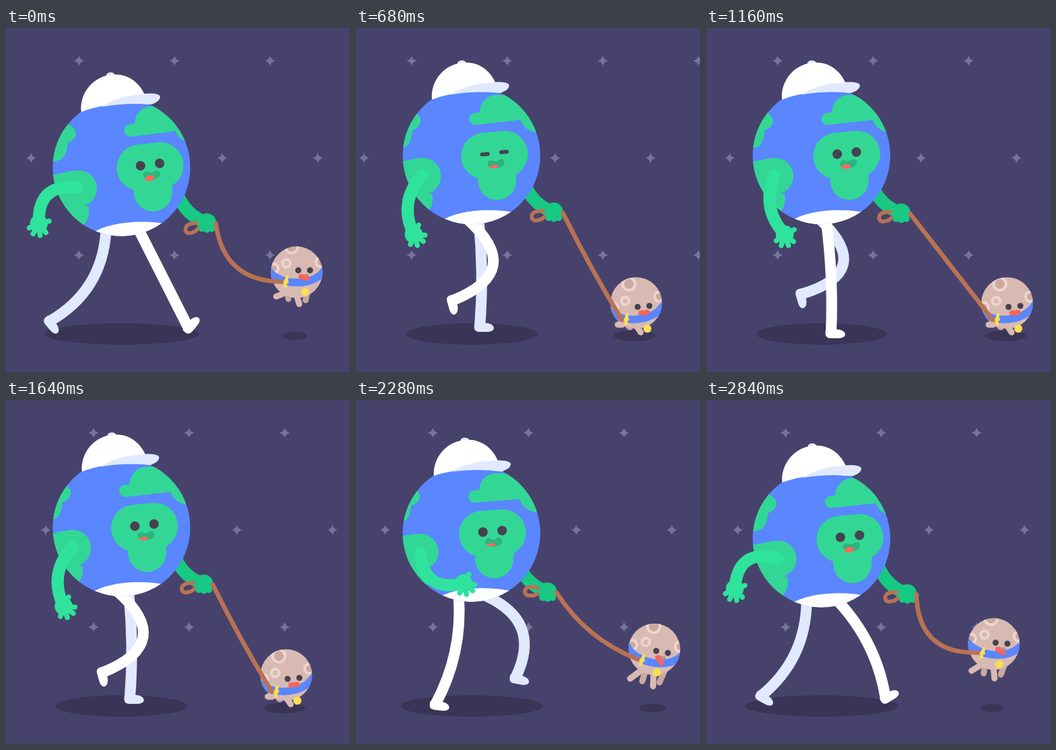
An HTML page for the animation above (2.88 s loop, 540 by 540 pixels).

```html
<!DOCTYPE html>
<html lang="en">
<head>
<meta charset="utf-8">
<title>Moon walk</title>
<style>
  html, body { margin: 0; width: 100%; height: 100%; overflow: hidden; background: #47426c; }
  svg { display: block; width: 100vw; height: 100vh; }
  .line { fill: none; stroke-linecap: round; stroke-linejoin: round; }
</style>
</head>
<body>
<svg viewBox="0 0 540 540">
  <defs>
    <clipPath id="globe"><circle cx="181.3" cy="200" r="108"/></clipPath>
    <clipPath id="disc"><circle r="40.5"/></clipPath>
    <path id="star" d="M0-8Q1.7-1.7 8 0Q1.7 1.7 0 8Q-1.7 1.7-8 0Q-1.7-1.7 0-8Z"/>
    <path id="foot" d="M-8.5-4C-10 5-8 9 0 9H11C18 9 22 6.5 22 3C22-2 15-5 8-5Z"/>
  </defs>

  <rect width="540" height="540" fill="#47426c"/>
  <g id="stars" fill="#78739a"></g>
  <g fill="#3a3457">
    <ellipse id="shade" cx="181.5" cy="480.3" ry="16.8"/>
    <ellipse id="moonShade" cy="483.3"/>
  </g>

  <path id="farArm" class="line" stroke="#17c983" stroke-width="20" d="M-47-46Q-33-10 0 0"/>
  <g id="farLeg" fill="#e0e9fe" stroke="#e0e9fe">
    <path class="line" stroke-width="17"/><use href="#foot" stroke="none"/>
  </g>
  <g id="nearLeg" fill="#fff" stroke="#fff">
    <path class="line" stroke-width="17"/><use href="#foot" stroke="none"/>
  </g>

  <g id="earth">
    <circle cx="181.3" cy="200" r="108" fill="#5a86ff"/>
    <g clip-path="url(#globe)">
      <g id="land" fill="#33d795" stroke="#33d795">
        <g stroke="none">
          <path d="M70 120L96 132Q106 138 105.5 147Q103 157 92 160Q92 175 84 184Q80 188 60 190Z"/>
          <path d="M40 214L80 208Q95 204 108 203.5V258L123 260Q127 280 112 292H40Z"/>
          <circle cx="108.500" cy="232" r="28.500"/>
          <path d="M198 149V131.500A26.500 26.500 0 0 1 224 105H310V166L285 164Q267 160 262 144.500L198 151Z"/>
        </g>
        <g class="line">
          <path d="M191 142.500L255 135.500" stroke-width="19"/>
          <path d="M205 201L237 198" stroke-width="73"/>
          <path d="M225 215V240" stroke-width="60"/>
          <path d="M215.500 213Q224 217 231.500 211.500" stroke="#2ab581" stroke-width="11"/>
        </g>
        <path id="grin" d="M-8.500 1Q0-6 8.500 0Q4 5-6 3Z" fill="#fa6a5a" stroke="none"/>
        <g id="eyes" fill="#46424f" stroke="none"></g>
      </g>
      <path d="M125 308Q150 288 200 286Q230 285 255 291V330H125Z" fill="#fff"/>
    </g>
    <ellipse cx="166.7" cy="55.500" rx="7" ry="5" fill="#dfe8fd"/>
    <path d="M119.500 112C117 82 140 54 173 54C199 54 215 72 222 92L229 102Q165 95 119.500 112Z" fill="#fff"/>
    <path id="brim" d="M150 104.500Q175 88 210 86C232 83 243 86 242 91C241 97 234 100 228 102Q190 98 150 104.500Z" fill="#e0e9fe"/>
  </g>

  <path id="nearArm" class="line" stroke="#2fe39c" stroke-width="19"/>
  <g id="nearHand" fill="#2fe39c">
    <circle r="14"/>
    <path class="line" stroke="#2fe39c" stroke-width="8" d="M0 0L-15 7M0 0L-9 16M0 0L2 18.500M0 0L11 14M0 0L16-4"/>
  </g>

  <g id="moon">
    <g id="paws" class="line" stroke-width="9.500"></g>
    <circle r="40.500" fill="#d8bab3"/>
    <g clip-path="url(#disc)">
      <g class="face">
        <g fill="#cda8a0" stroke="#ecd5cf" stroke-width="4.300">
          <circle cx="-16" cy="-14" r="6" fill="#d8bab3"/>
          <circle cx="-8" cy="-40" r="9.700"/>
          <circle cx="38" cy="-16" r="7.500"/>
          <circle cx="-36" cy="-6" r="7"/>
        </g>
        <g fill="#46424f"><circle cx="2.500" cy="-3" r="4.800"/><circle cx="21" cy="-3" r="4.800"/></g>
        <path class="line" stroke="#5a86ff" stroke-width="12" d="M-46-5C-30 22 28 25 46-6"/>
        <path class="line" stroke="#b8958d" stroke-width="6" d="M8 5.500Q12 8 16 5.500"/>
        <path id="tongue" class="line" stroke="#fa6455" stroke-width="7.500" d="M0 0H10.500"/>
      </g>
    </g>
    <circle id="bell" r="6.300" fill="#ffdf4f"/>
    <g class="face">
      <path class="line" stroke="#ffdf4f" stroke-width="5" d="M-15 8Q-18 15-18 22M-23 16L-15 15"/>
    </g>
  </g>

  <path id="loop" class="line" stroke="#b97254" stroke-width="6" d="M-8-1C-20-3-34-3-35 6C-35 15-26 13-20 11L-8 2"/>
  <g id="fist" fill="#17c983">
    <circle r="14.500"/><circle cx="-8" cy="9.500" r="5"/><circle cy="11" r="5"/><circle cx="8" cy="9.500" r="5"/>
  </g>
  <path id="leash" class="line" stroke="#b97254" stroke-width="7"/>
</svg>

<script>
const LOOP = 2880, WALK = 960, STEP = 480, TICK = 40;
const $ = id => document.getElementById(id);
const set = (el, attrs) => { for (const k in attrs) el.setAttribute(k, attrs[k]); return el; };
const add = (parent, tag, attrs) =>
  parent.appendChild(set(document.createElementNS("http://www.w3.org/2000/svg", tag), attrs));
const move = (el, x, y, a = 0) => set(el, { transform: `translate(${x} ${y}) rotate(${a})` });
const wave = (t, period) => Math.cos(2 * Math.PI * t / period);
const smooth = u => u * u * (3 - 2 * u);

// A limb from a to b, bowed sideways by bend
function noodle([ax, ay], [bx, by], bend) {
  const dx = bx - ax, dy = by - ay, d = Math.hypot(dx, dy);
  const at = u => `${ax + dx * u + bend * dy / d} ${ay + dy * u - bend * dx / d}`;
  return `M${ax} ${ay}C${at(1 / 3)} ${at(2 / 3)} ${bx} ${by}`;
}

for (const [y, x] of [[51.5, 114.5], [204, 39.5], [356.5, 114.5]])
  for (let k = 0; k < 5; k++) add($("stars"), "use", { href: "#star", x: x + 150 * k, y });

const eyes = [[206, 198], [236, 194.7]].map(([x, y]) => ({
  y, el: add($("eyes"), "rect", { x: x - 7.5, width: 15, transform: `rotate(-5 ${x} ${y})` })
}));

// Hip x and resting foot, far paws first
const paws = [[-14, -13, 42], [16, 14, 44], [-22, -32, 38], [-1, 4, 50]].map(([hip, x, y], i) => ({
  hip, x, y, el: add($("paws"), "path", { stroke: i < 2 ? "#c9a8a0" : "#d8bab3" })
}));

// The foot slides back on the ground for one step, then swings forward
function foot(t) {
  const u = t % STEP / STEP, side = 2 * u - 1, arc = Math.sin(Math.PI * u);
  const roll = 8 * side ** 4;
  return t % WALK < STEP
    ? { x: 286 - 215 * u, y: 478 - roll, angle: 50 * side ** 3, bend: 30 * u * u }
    : {
        x: 71 + 215 * smooth(u), y: 478 - roll - 53 * arc ** 1.5,
        angle: 50 - 100 * smooth(u) + 64 * arc, bend: 30 * (1 - u) + 55 * arc
      };
}

function drawLeg(g, t, far) {
  const f = foot(t), x = f.x - 2 * far, y = f.y - 10 * far;
  const hip = [181 + 28 * wave(t, WALK) + 4 * far, 308 + 10 * wave(t, STEP)];
  set(g.firstElementChild, { d: noodle(hip, [x, y], f.bend) });
  move(g.lastElementChild, x, y, f.angle);
}

function drawEarth(t, bob, tilt) {
  const sway = wave(t, WALK), turn = 7 * sway - 1.8;
  set($("shade"), { rx: 111.8 + bob });
  set($("earth"), { transform: `translate(0 ${8.8 + bob}) rotate(${tilt} 181.3 200)` });
  move($("land"), turn, 0);
  move($("brim"), turn * 0.35, 0);
  set($("grin"), { transform: `translate(220 217) scale(1 ${1.05 + 0.4 * sway})` });

  const shut = Math.max(0, Math.min(1, 1.6 - Math.abs(t - 680) / 50));
  const h = 15 - 9 * shut;
  eyes.forEach(e => set(e.el, { y: e.y - h / 2, height: h, rx: h / 2 }));

  drawLeg($("nearLeg"), t, 0);
  drawLeg($("farLeg"), t + STEP, 1);
}

function drawArms(t, bob, tilt, swing) {
  const shoulder = [105.5 + 7 * wave(t, WALK), 240 + bob];
  const hand = [107 - 64 * swing, 336 - 52 * swing * swing + bob];
  const reach = Math.hypot(hand[0] - shoulder[0], hand[1] - shoulder[1]);
  set($("nearArm"), { d: noodle(shoulder, hand, -0.58 * Math.sqrt(Math.max(0, 1e4 - reach * reach))) });
  move($("nearHand"), ...hand, 32 * wave(t - 50, WALK) - 30);

  const fist = [308.5 + 8 * swing, 298 - 3 * swing + bob];
  move($("farArm"), ...fist);
  move($("fist"), ...fist);
  move($("loop"), ...fist, 8 * tilt);
  return fist;
}

function drawMoon(t, [fx, fy]) {
  const s = wave(t - STEP / 4, STEP);
  const fall = (0.5 + 0.5 * wave(t - 210, STEP)) ** 1.5;
  const x = 456.3 + 17 * wave(t - WALK / 4, WALK), y = 383 + 49 * fall;
  const tilt = -10 * s, drop = 5 - 5 * wave(t, STEP);

  set($("moonShade"), { cx: x - 2.6, rx: 19 + 13.4 * fall, ry: 6.5 + 2 * fall });
  move($("moon"), x, y);
  document.querySelectorAll(".face").forEach(el => move(el, 0, drop, tilt));
  move($("tongue"), 6.5, 7, 15 + 3 * tilt);
  move($("bell"), 13 - 0.9 * tilt, 31 + drop);
  paws.forEach(p => set(p.el, { d: `M${p.hip} 34L${p.x + 6 * s} ${p.y - 8 * s}` }));

  // The leash meets the collar ring at (-24, 15) on the tilted face
  const a = tilt * Math.PI / 180, cos = Math.cos(a), sin = Math.sin(a);
  const from = [fx + 14, fy + 1.5];
  const to = [x - 24 * cos - 15 * sin, y + drop - 24 * sin + 15 * cos];
  const slack = Math.max(0, 203 - Math.hypot(to[0] - from[0], to[1] - from[1]));
  set($("leash"), { d: noodle(from, to, -42 * (slack / 68) ** 1.5) });
}

function draw(t) {
  const c = wave(t, STEP), s = wave(t - STEP / 4, STEP);
  const bob = 10 * c, tilt = -0.1 - 0.9 * c - 1.8 * s, swing = wave(t + 80, WALK);
  move($("stars"), -(t * 750 / LOOP) % 150, 0);
  drawEarth(t, bob, tilt);
  drawMoon(t, drawArms(t, bob, tilt, swing));
}

const start = performance.now();
function play() {
  const t = performance.now() - start + 8;
  draw(Math.floor(t / TICK) * TICK % LOOP);
  requestAnimationFrame(play);
}
play();
</script>
</body>
</html>
```
